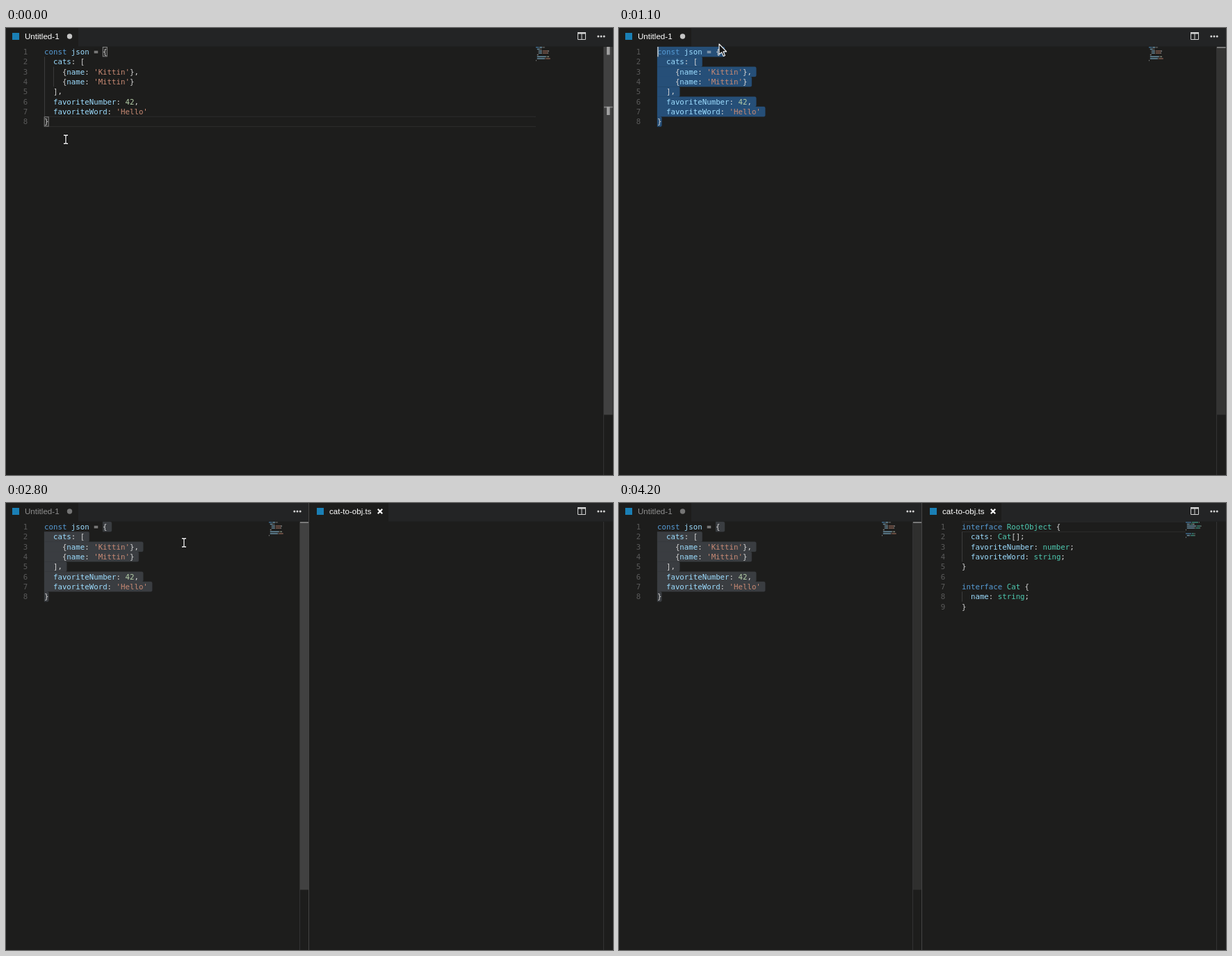
An HTML page for the animation above (4.3 s loop, 873 px wide and 642 px high).

```html
<!DOCTYPE html>
<html lang="en">
<head>
<meta charset="utf-8">
<title>Editor</title>
<style>
  html, body { margin: 0; width: 100%; height: 100%; overflow: hidden; background: #1d1d1c; }
  svg { display: block; }
  .code { font: 10.75px "DejaVu Sans Mono", monospace; }
  .tab { font: 11.6px "Liberation Sans", Arial, sans-serif; }
</style>
</head>
<body>
<svg id="stage" width="873" height="642" viewBox="0 0 873 642"></svg>
<script>
const LOOP = 4300, CW = 6.47, LH = 14.33, TOP = 27, TEXT_X = 55;
const BG = '#1d1d1c', BAR = '#232425', LIGHT = '#d4d4d4';

const json = [
  'const json = {',
  '  cats: [',
  "    {name: 'Kittin'},",
  "    {name: 'Mittin'}",
  '  ],',
  '  favoriteNumber: 42,',
  "  favoriteWord: 'Hello'",
  '}'
];
const types = [
  'interface RootObject {',
  '  cats: Cat[];',
  '  favoriteNumber: number;',
  '  favoriteWord: string;',
  '}',
  '',
  'interface Cat {',
  '  name: string;',
  '}'
];

// Stepped tracks: [time, ...values]
const mouseTrack = [
  [0, 86, 160], [600, 86, 125], [700, 110, 57], [900, 135, 36],
  [1000, 143, 25], [1100, 144, 23], [1200, 151, 36], [1400, 152, 46],
  [1700, 158, 58], [1800, 152, 54], [1900, 147, 49], [2100, 185, 57],
  [2200, 240, 58], [2300, 256, 57], [3700, 235, 48], [3800, 180, 22],
  [3900, 140, 4], [4000, -50, -50]
];
const caretTrack = [[0, 7, 1], [600, 4, 4], [700, 0, 13], [900, 0, 0], [1200, 0, 13]];
const blinkTrack = [
  [0, 0], [300, 1], [1700, 0], [1900, 1], [2300, 0], [2700, 1],
  [3400, 0], [3900, 1], [4200, 0]
];

const at = (track, t) => track.filter(k => k[0] <= t).pop().slice(1);
const clamp = v => Math.max(0, Math.min(1, v));
const lineY = i => TOP + i * LH;
const rect = (x, y, w, h, fill, more = '') =>
  `<rect x="${x}" y="${y}" width="${w}" height="${h}" fill="${fill}" ${more}/>`;
const path = (d, more) => `<path d="${d}" ${more}/>`;
const text = (x, y, s, fill, more = '') =>
  `<text x="${x}" y="${y}" fill="${fill}" ${more}>${s}</text>`;
const group = (x, body, more = '') => `<g transform="translate(${x})" ${more}>${body}</g>`;

function colour(word) {
  if (/^(const|interface)$/.test(word)) return '#569cd6';
  if (/^'/.test(word)) return '#c98a74';
  if (/^\d/.test(word)) return '#b5cea8';
  if (/^([A-Z]\w*|number|string)$/.test(word)) return '#4ec9b0';
  return /^\w/.test(word) ? '#9cdcfe' : LIGHT;
}

function tokens(lines, draw) {
  return lines.map((line, row) =>
    [...line.matchAll(/'.*?'|\w+|[^\w\s']+/g)]
      .map(m => draw(m[0], m.index, row)).join('')).join('');
}

function codeText(lines) {
  const numbers = lines.map((_, i) =>
    text(31.3, lineY(i) + 11, i + 1, '#5a5a5a', 'text-anchor="end"')).join('');
  const words = tokens(lines, (s, col, row) =>
    text(TEXT_X + col * CW, lineY(row) + 11, s, colour(s)));
  return `<g class="code">${numbers}${words}</g>`;
}

const minimap = (lines, x) => group(x, tokens(lines, (s, col, row) =>
  rect(col * 0.9, TOP + row * 2.7, s.length * 0.9, 1.5, colour(s))), 'opacity=".6"');

const guide = (col, from, to) =>
  rect(TEXT_X + col * CW, lineY(from), 1, (to - from) * LH, '#3c3c3c');

const lineBorder = (row, end) => [0, 1].map(k =>
  rect(TEXT_X, lineY(row + k) - 0.5, end - TEXT_X, 1, '#2d2d2d')).join('');

const caret = (row, col) => rect(TEXT_X + col * CW + 0.2, lineY(row), 1.5, LH, '#c4c5c3');

function selection(row, col, fill) {
  let out = '';
  for (let i = row; i < json.length; i++) {
    const x = TEXT_X + (i === row ? col : 0) * CW;
    const end = TEXT_X + (json[i].length + (i < 7 ? 1 : 0)) * CW;
    out += path(`M${x} ${lineY(i)}H${end - 2}q2 0 2 2v${LH - 4}q0 2 -2 2H${x}z`,
      `fill="${fill}" stroke="${fill}" stroke-width=".3"`);
  }
  return out;
}

const bracket = (row, col) => rect(TEXT_X + col * CW + 0.2, lineY(row) + 0.5, 6, LH - 1,
  '#ffffff08', 'stroke="#858585"');

function ruler(x, height, opacity) {
  return rect(x - 1, TOP, 1, 642, '#333') +
    rect(x, TOP, 12.5, height, '#797979', `opacity="${0.4 * opacity}"`);
}

const marker = (x, row) => rect(x, TOP + row * 12.25, 12.5, 1.8, '#808080');

const dots = x => [-4.2, 0, 4.2].map(d =>
  `<circle cx="${x + d}" cy="12" r="1.5" fill="${LIGHT}"/>`).join('');

const splitIcon = path('M822.5 7.5h11v9h-11zM828 8v8', `fill="none" stroke="${LIGHT}"`) +
  rect(822, 6, 12, 2.5, LIGHT);

const fileBadge = rect(9, 7, 10, 10, '#1a7fb5');

const tab = (name, width, fill, more = '') => rect(0, 0, width, TOP, BG) + fileBadge +
  text(27, 15.6, name, fill, `class="tab" ${more}`);

function pointer(x, y) {
  if (y < 27) {
    return path(`M${x} ${y}v15l3.6-3.2 2.5 5.6 2.4-1-2.5-5.5h4.6z`,
      'fill="#161616" stroke="#fff" stroke-width="1.1" stroke-linejoin="round"');
  }
  const d = `M${x - 3} ${y - 6}h2.2l.8.7.8-.7h2.2M${x} ${y - 5.5}v11M${x - 3} ${y + 6}h2.2l.8-.7.8.7h2.2`;
  return path(d, 'fill="none" stroke="#000" stroke-width="3"') +
    path(d, 'fill="none" stroke="#fff" stroke-width="1.3"');
}

function leftSlider(t) {
  if (t < 1200) return clamp(1 - (t - 800) / 800);
  if (t < 3800) return clamp(0.5 + (t - 1200) / 200);
  return clamp(1 - (t - 3800) / 800);
}

const rightSlider = t => Math.min(clamp((t - 2800) / 200), clamp(1 - (t - 3400) / 800));

function leftPane(t, split) {
  const [row, col] = at(caretTrack, t);
  const selecting = t >= 600, rulerX = split ? 423 : 860;
  let s = tab('Untitled-1', 104, split ? '#8f8f8f' : '#fff') +
    `<circle cx="91.5" cy="12" r="3.7" fill="${split ? '#757575' : '#c5c5c5'}"/>`;
  s += guide(0, 1, 7) + guide(2, 2, 4);
  s += selecting ? selection(row, col, split ? '#3a3d41' : '#264f78')
    : lineBorder(7, 762) + bracket(0, 13) + bracket(7, 0);
  s += codeText(json) + minimap(json, split ? 378 : 762);
  s += ruler(rulerX, 528.5, leftSlider(t)) + marker(rulerX, row);
  if (!selecting) s += rect(864, 27, 4.5, 11.5, '#a0a0a0') + rect(864, 113, 4.5, 12, '#a0a0a0');
  if (!split && at(blinkTrack, t)[0]) s += caret(row, col);
  return s;
}

function rightPane(t) {
  let s = group(-2, rect(0, 0, 2, TOP, BG)) +
    tab('cat-to-obj.ts', 112, '#fff', 'font-style="italic"') +
    path('M96.8 8.8l6.4 6.4m0-6.4l-6.4 6.4', 'stroke="#fff" stroke-width="2.1"');
  if (t >= 2900) {
    s += lineBorder(0, 377) + guide(0, 1, 4) + guide(0, 7, 8) + codeText(types) + minimap(types, 377);
    if (at(blinkTrack, t)[0]) s += caret(0, 0);
  }
  return group(438, s) + ruler(860, 518.5, rightSlider(t));
}

function scene(t) {
  const split = t >= 2800;
  let s = rect(0, 0, 873, 642, BG) + rect(0, 0, 873, 26.5, BAR) + leftPane(t, split);
  if (split) s += dots(419) + rightPane(t) + rect(435, 0, 1, 642, '#444');
  return s + splitIcon + dots(856) + pointer(...at(mouseTrack, t));
}

const stage = document.getElementById('stage');
const start = performance.now();
let shown = -1;

function frame() {
  const t = Math.floor((performance.now() - start) % LOOP / 100) * 100;
  if (t !== shown) stage.innerHTML = scene(shown = t);
  requestAnimationFrame(frame);
}
frame();
</script>
</body>
</html>
```
